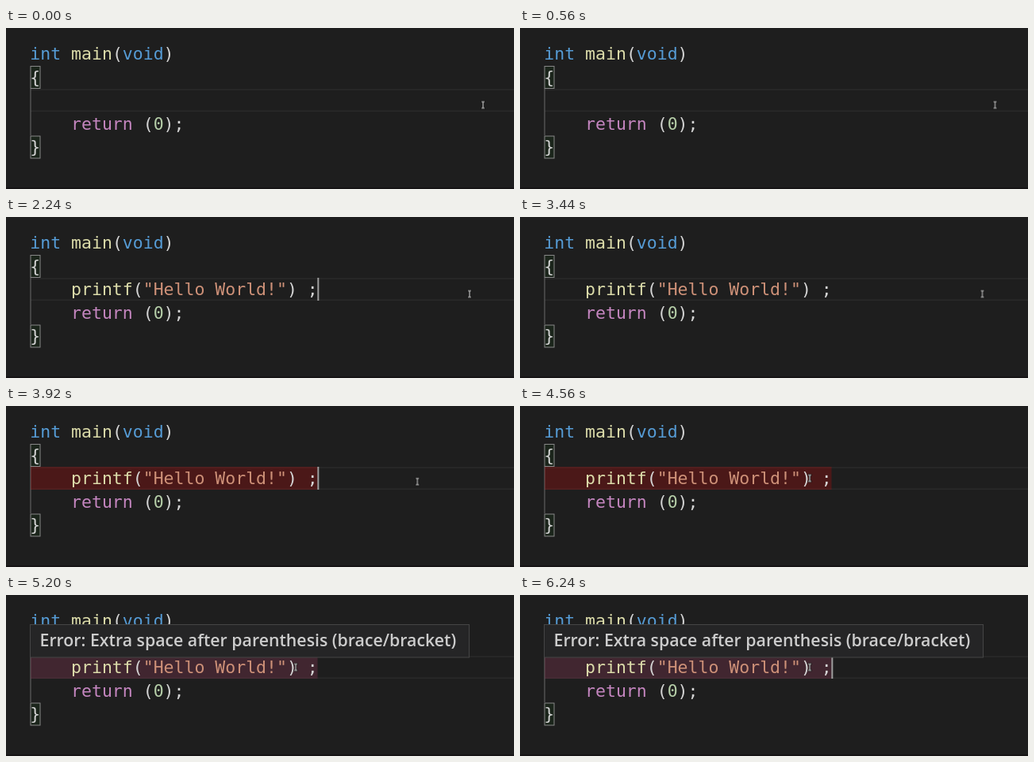
An HTML page that plays this animation: 640 px wide and 204 px high, repeating every 6.4 s.

```html
<!DOCTYPE html>
<html lang="en">
<head>
<meta charset="utf-8">
<title>Code editor lint hover</title>
<style>
  html, body { margin: 0; width: 100%; height: 100%; overflow: hidden; background: #1e1e1e; }
  svg { display: block; width: 100vw; height: 100vh; }

  .code { font: 21.5px "DejaVu Sans Mono", monospace; fill: #d4d4d4; white-space: pre; }
  .type { fill: #569cd6; }
  .func { fill: #dcdcaa; }
  .ctrl { fill: #c586c0; }
  .num  { fill: #b5cea8; }
  .str  { fill: #ce9178; }

  .bracket { fill: rgba(0, 100, 0, .1); stroke: #888; }
  .line { fill: #2a2a2a; }
  .tip rect { fill: #252526; stroke: #454545; }
  .tip text { font: 600 21.3px "Open Sans", "Noto Sans", sans-serif; fill: #ccc; }

  .paste, .error, .hover, .caret { animation: 6.4s step-end infinite; }
  .paste { animation-name: paste; }
  .error { animation-name: error; fill: rgba(255, 0, 0, .2); }
  .hover { animation-name: hover; }
  .mark  { fill: rgba(38, 79, 120, .25); }
  .caret { animation-name: blink, jump; fill: #c8c8c8; }
  .mouse { animation: mouse 6.4s step-end infinite; fill: none; }

  @keyframes paste { 0% { opacity: 0; } 35%, 100% { opacity: 1; } }
  @keyframes error { 0% { opacity: 0; } 56.25%, 100% { opacity: 1; } }
  @keyframes hover { 0% { opacity: 0; } 72.5%, 100% { opacity: 1; } }
  @keyframes blink {
    0%, 41.25%, 53.75%, 66.25%, 78.75%, 91.25% { opacity: 0; }
    28.75%, 47.5%, 60%, 72.5%, 85%, 97.5%, 100% { opacity: 1; }
  }
  @keyframes jump {
    0% { transform: translateX(82.5px); }
    35%, 100% { transform: translateX(392.5px); }
  }
  @keyframes mouse {
    0% { transform: translate(601px, 97.5px); }
    2.5% { transform: translate(600px, 97.5px); }
    6.25% { transform: translate(598.5px, 97.5px); }
    23.75% { transform: translate(585px, 97.5px); }
    25% { transform: translate(584px, 97.5px); }
    37.5% { transform: translate(582.5px, 97.5px); }
    57.5% { transform: translate(582.5px, 97.5px); animation-timing-function: ease-in-out; }
    67.5%, 100% { transform: translate(365px, 91.5px); }
  }
</style>
</head>
<body>
<svg viewBox="0 0 640 204" preserveAspectRatio="none">
  <rect width="640" height="204" fill="#1e1e1e"/>
  <rect y="202" width="640" height="2" fill="#161415"/>

  <!-- active line, indent guide, matching brackets -->
  <rect class="line" x="31" y="77.3" width="609" height="1.5"/>
  <rect class="line" x="31" y="104.5" width="609" height="1.5"/>
  <rect x="30.5" y="77" width="1" height="59" fill="#6a6a6a"/>
  <rect class="bracket" x="31" y="48.5" width="12" height="28"/>
  <rect class="bracket" x="31" y="137" width="12" height="28"/>

  <rect class="error" x="31" y="77" width="361.5" height="29"/>
  <rect class="hover mark" x="31" y="77" width="361.5" height="29"/>

  <g class="code">
    <text x="30.3" y="40.2"><tspan class="type">int</tspan> <tspan class="func">main</tspan>(<tspan class="type">void</tspan>)</text>
    <text x="30.3" y="69.7">{</text>
    <text class="paste" x="82.1" y="99.2"><tspan class="func">printf</tspan>(<tspan class="str">"Hello World!"</tspan>) ;</text>
    <text x="82.1" y="128.7"><tspan class="ctrl">return</tspan> (<tspan class="num">0</tspan>);</text>
    <text x="30.3" y="158.2">}</text>
  </g>

  <rect class="caret" y="77" width="1.5" height="29"/>

  <g class="hover tip">
    <rect x="30.5" y="37.5" width="553" height="41.5"/>
    <text x="42.5" y="65">Error: Extra space after parenthesis (brace/bracket)</text>
  </g>

  <g class="mouse">
    <path d="M-2.5-4H2.5M-2.5 4H2.5M0-4V4" stroke="#111" stroke-width="2.4"/>
    <path d="M-2-4H2M-2 4H2M0-4V4" stroke="#d0d0d0" stroke-width="1.1"/>
  </g>
</svg>
</body>
</html>
```
